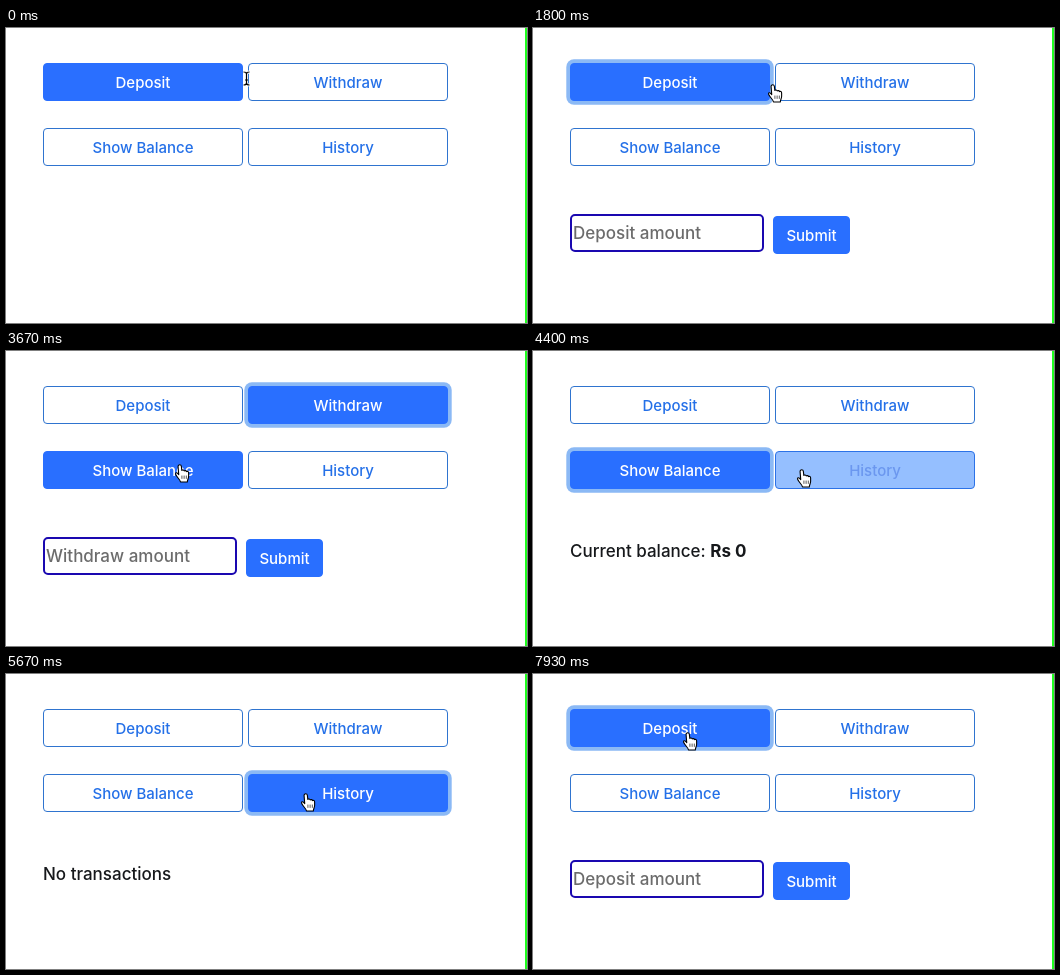
Write an HTML page that moves like this. It is 521x295 px and loops after 8 s.

```html
<!DOCTYPE html>
<html lang="en">
<head>
<meta charset="utf-8">
<title>Banking buttons</title>
<style>
  html, body { margin: 0; width: 100%; height: 100%; overflow: hidden; background: #fff; }
  body { position: relative; font: 450 17px Inter, "Open Sans", sans-serif; color: #16181b; }
  body > * { position: absolute; box-sizing: border-box; white-space: nowrap; }
  .btn {
    display: flex; align-items: center; justify-content: center;
    height: 38px; border: 1px solid #296fff; border-radius: 4px;
    font-size: 15px; font-weight: 500;
  }
  .choice { width: 200px; }
  #submit { left: 240px; top: 188px; width: 77px; background: #296fff; color: #fff; }
  #field {
    left: 37px; top: 186px; width: 194px; height: 38px; padding-left: 1px;
    border: 2px solid #1a08b0; border-radius: 5px; line-height: 35px; color: #6c6c6c;
  }
  #note { left: 37px; top: 188px; line-height: 24px; }
  #edge { left: 519px; top: 0; width: 2px; height: 100%; background: #1eff1e; }
  svg { left: 0; top: 0; overflow: visible; }
  #beam { transform: translate(237px, 43px); }
</style>
</head>
<body>
<div id="field"></div>
<div id="submit" class="btn">Submit</div>
<div id="note"></div>
<div id="edge"></div>
<svg id="beam" width="8" height="16" fill="none">
  <defs><path id="bar" d="M.5 1Q3.5 1 3.5 3V12Q3.5 14 .5 14M6.5 1Q3.5 1 3.5 3M3.5 12Q3.5 14 6.5 14M2 9H5"/></defs>
  <use href="#bar" stroke="#fff" stroke-width="3"/>
  <use href="#bar" stroke="#000" stroke-width="1.2"/>
</svg>
<svg id="hand" width="15" height="18" fill="#fff" stroke="#000" stroke-linejoin="round">
  <g transform="translate(-1 -1) scale(1.1)">
    <path d="M5.2.7c.9 0 1.4.6 1.5 1.4l.4 3.7c.4-.6 2-.4 2.2.5.5-.6 1.9-.3 2.1.6.7-.4 1.9-.1 1.9 1.2v3c0 2-1 2.8-1.2 5.2H5.9c-.2-1.7-2.4-3.4-3.5-5.4-.5-1-1.6-2-.9-2.7.8-.7 1.8.2 2.8 1.4L3.7 2.4C3.6 1.5 4.3.7 5.2.7z"/>
    <path d="M7.2 10.5v3M9.2 10.5v3M11.2 10.5v3" stroke-width=".6"/>
  </g>
</svg>
<script>
const LOOP = 8000, STEP = 1000 / 15, FADE = 150, SWAP = 75;
const BLUE = [41, 111, 255], EDGE = [47, 116, 207], INK = [36, 112, 232], WHITE = [255, 255, 255];
const $ = id => document.getElementById(id);

const buttons = ["Deposit", "Withdraw", "Show Balance", "History"].map((label, i) => {
  const el = document.createElement("div");
  el.className = "btn choice";
  el.textContent = label;
  el.style.left = (i % 2 ? 242 : 37) + "px";
  el.style.top = (i < 2 ? 35 : 100) + "px";
  $("edge").before(el);
  return el;
});

// the hand travels to (x, y), hovers a button, then clicks it
const visits = [
  { button: 0, from: 260, to: 670, x: 194, y: 57, hover: -140, click: 940, form: "Deposit amount" },
  { button: 1, from: 1640, to: 2000, x: 292, y: 56, hover: 1820, click: 2307, form: "Withdraw amount" },
  { button: 2, from: 2530, to: 3200, x: 169, y: 114, hover: 2940, click: 3690, note: "Current balance: <b>Rs 0</b>" },
  { button: 3, from: 4130, to: 4530, x: 295, y: 120, hover: 4360, click: 5250, note: "No transactions" },
  { button: 0, from: 5940, to: 6530, x: 150, y: 59, hover: 6360, click: 7020, form: "Deposit amount" }
];
// a button stays lit until the next one is clicked
visits.forEach((v, i) => v.end = i + 1 < visits.length ? visits[i + 1].click : Infinity);

const clamp = x => Math.min(1, Math.max(0, x));
const fade = (t, start) => 1 - (1 - clamp((t - start) / FADE)) ** 2.2;
const span = (t, a, b) => fade(t, a) * (1 - fade(t, b));
const smooth = x => x * x * (3 - 2 * x);
// green lags behind in the blend
const mix = (a, b, p) =>
  `rgb(${a.map((v, i) => v + (b[i] - v) * (i === 1 ? p ** 1.15 : p))})`;

function drawButton(el, i, t) {
  const own = visits.filter(v => v.button === i);
  const lit = Math.max(...own.map(v => span(t, v.hover, v.end)));
  const ring = Math.max(...own.map(v => span(t, v.click, v.end)));
  el.style.background = mix(WHITE, BLUE, lit);
  el.style.borderColor = mix(EDGE, BLUE, lit);
  el.style.color = mix(INK, WHITE, lit ** 1.6);
  el.style.boxShadow = `0 0 0 ${3.7 * ring}px rgba(24,116,236,${0.5 * ring})`;
}

function drawHand(t) {
  let x = 229, y = 52;
  for (const v of visits) {
    const k = smooth(clamp((t - v.from) / (v.to - v.from)));
    x += (v.x - x) * k;
    y += (v.y - y) * k;
  }
  const pointing = t >= visits[0].from;
  $("beam").style.display = pointing ? "none" : "";
  $("hand").style.display = pointing ? "" : "none";
  $("hand").style.transform = `translate(${Math.round(x)}px, ${Math.round(y)}px)`;
}

let shown;
function drawPage(t) {
  const page = visits.filter(v => v.click + SWAP <= t).pop() || {};
  if (page === shown) return;
  shown = page;
  $("field").textContent = page.form || "";
  $("note").innerHTML = page.note || "";
  $("field").style.display = $("submit").style.display = page.form ? "" : "none";
}

function draw(t) {
  buttons.forEach((el, i) => drawButton(el, i, t));
  drawHand(t);
  drawPage(t);
}

const start = performance.now();
function tick(now) {
  const t = Math.max(0, now - start) % LOOP;
  draw(Math.floor((t + 4) / STEP) * STEP);
  requestAnimationFrame(tick);
}
draw(0);
requestAnimationFrame(tick);
</script>
</body>
</html>
```
